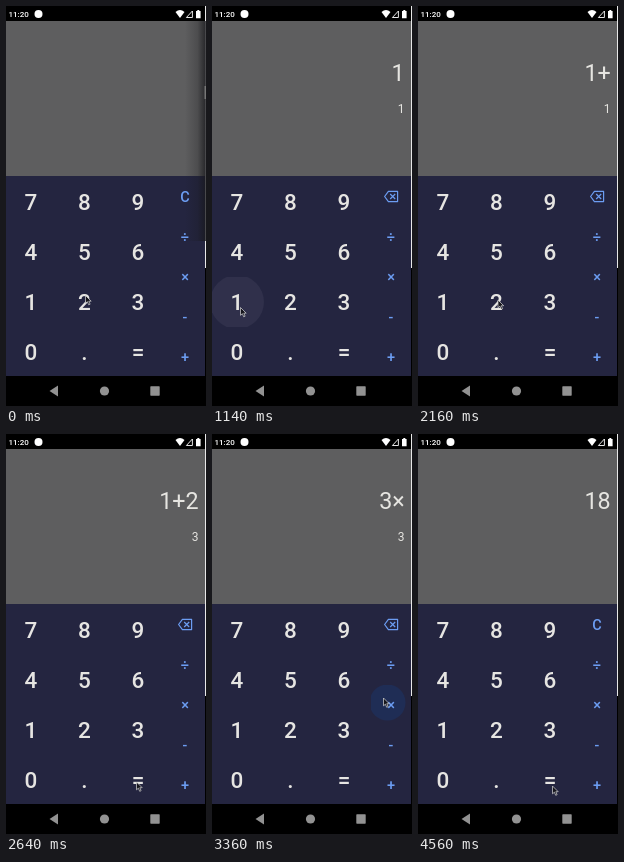
These frames come from a looping animation (200 px wide and 400 px high, 4.86 s). An HTML page:

```html
<!DOCTYPE html>
<html lang="en">
<head>
<meta charset="utf-8">
<title>Calculator</title>
<style>
  html, body { margin: 0; width: 100%; height: 100%; overflow: hidden; background: #000; }
  svg { display: block; width: 100%; height: 100%; }
  text { font-family: Roboto, sans-serif; }
  .key { font-size: 22.5px; font-weight: 500; fill: #e6e5e2; text-anchor: middle; }
  .op { font-size: 14.5px; font-weight: 500; fill: #6c9df2; text-anchor: middle; }
  .out { fill: #e6e5e1; text-anchor: end; }
</style>
</head>
<body>
<svg viewBox="0 0 200 400" xmlns="http://www.w3.org/2000/svg">
  <defs>
    <linearGradient id="shade">
      <stop offset="0" stop-color="#18181c" stop-opacity="0"/>
      <stop offset=".6" stop-color="#18181c" stop-opacity=".25"/>
      <stop offset="1" stop-color="#18181c" stop-opacity=".8"/>
    </linearGradient>
    <clipPath id="cell"><rect id="cellBox"/></clipPath>
  </defs>

  <rect width="200" height="400"/>
  <rect y="15" width="199" height="155" fill="#5e5e5f"/>
  <rect y="170" width="199" height="200" fill="#242540"/>
  <rect x="199" width="1" height="262" fill="#e8e8e8"/>
  <g id="edge">
    <rect x="179" y="15" width="21" height="220" fill="url(#shade)"/>
    <rect x="198.5" y="80" width="1.5" height="13" fill="#777"/>
  </g>

  <g fill="#fff">
    <text x="2.5" y="11" font-size="8" font-weight="500">11:20</text>
    <circle cx="32.5" cy="8" r="4"/>
    <path d="M169.5 6Q174 2 178.5 6L174 12Z"/>
    <path d="M180.4 11.5L186.4 5V11.5Z" fill="none" stroke="#fff" stroke-width=".9"/>
    <path d="M190 5h1.3v-1h2v1h1.3v7.2h-4.6z"/>
  </g>

  <g fill="#929292">
    <path d="M43.5 385L52 379.6V390.4Z"/>
    <circle cx="98.5" cy="385" r="4.6"/>
    <rect x="144.3" y="380.3" width="9.4" height="9.4" rx=".6"/>
  </g>

  <g clip-path="url(#cell)"><circle id="ripple"/></g>
  <g id="keys"></g>
  <text id="clear" class="op" x="179" y="196">C</text>
  <g id="del" fill="none" stroke="#6c9df2" stroke-width="1.2" stroke-linejoin="round">
    <path d="M172.6 190.5L176.4 185.4H185.6V195.6H176.4Z"/>
    <path d="M178.2 188l5 5m0-5l-5 5"/>
  </g>

  <text id="formula" class="out" x="192.7" y="74.5" font-size="23.3"></text>
  <text id="result" class="out" x="192.5" y="107" font-size="12"></text>
  <path id="cursor" d="M0 0V7.8L1.9 6.2L3.2 9.3L4.6 8.7L3.3 5.7H5.7Z" fill="#16161c" stroke="#d8d8d8" stroke-width=".7" stroke-linejoin="round"/>
</svg>
<script>
const LOOP = 4860, STEP = 60, FADE = 240;
const $ = id => document.getElementById(id);

function setAttrs(el, attrs) {
  for (const name in attrs) el.setAttribute(name, attrs[name]);
}

function addKey(label, cls, x, y) {
  const el = document.createElementNS("http://www.w3.org/2000/svg", "text");
  el.textContent = label;
  setAttrs(el, { class: cls, x, y });
  $("keys").append(el);
}

[..."7894561230.="].forEach((k, i) =>
  addKey(k, "key", 25 + 53.5 * (i % 3), 204 + 50 * Math.floor(i / 3)));
[..."÷×-+"].forEach((k, i) => addKey(k, "op", 179, 236 + 40 * i));

// Pointer stops: time, x, y
const path = [
  [0, 79.5, 289.5], [480, 28.5, 301.5], [1200, 28.5, 301.5], [1560, 125, 337],
  [1740, 176, 348], [1920, 176, 348], [2160, 80, 294], [2340, 80, 294],
  [2580, 130.5, 348], [2940, 130.5, 348], [3240, 171.5, 264], [3420, 171.5, 264],
  [3510, 133, 246], [3600, 133, 246], [3780, 135.5, 351.5], [4380, 135.5, 351.5],
  [4560, 134.5, 352]
];

// Display states: time, formula, result, clear label shown
const states = [
  [0, "", "", true], [960, "1", "1", false], [1800, "1+", "1", false],
  [2220, "1+2", "3", false], [3240, "3", "", true], [3360, "3×", "3", false],
  [3540, "3×6", "18", false], [4440, "18", "", true]
];

// Taps: time, key centre x, y, operator column
const taps = [
  [960, 25, 296], [1800, 179, 351, true], [2220, 78.5, 296], [2760, 132, 346],
  [3360, 179, 271, true], [3540, 132, 246], [3960, 132, 346]
];

const lastAt = (list, t) => list.filter(item => item[0] <= t).pop();
const mix = (a, b, k) => a + (b - a) * k;

function pointer(t) {
  const a = lastAt(path, t), b = path[path.indexOf(a) + 1];
  if (!b) return [a[1], a[2]];
  const k = (t - a[0]) / (b[0] - a[0]);
  return [mix(a[1], b[1], k), mix(a[2], b[2], k)];
}

function drawRipple(t) {
  const tap = lastAt(taps, t);
  const age = tap ? t - tap[0] : FADE;
  if (age >= FADE) return setAttrs($("ripple"), { opacity: 0 });
  const [start, x, y, op] = tap;
  const from = pointer(start);
  const k = Math.min(1, age / 180);
  const w = op ? 40 : 54, h = op ? 40 : 50;
  setAttrs($("cellBox"), { x: x - w / 2, y: y - h / 2, width: w, height: h });
  setAttrs($("ripple"), {
    cx: mix(from[0] + 4, x, k), cy: mix(from[1] + 4.5, y, k),
    r: mix(18, op ? 22 : 27, k),
    fill: op ? "#1f2d55" : "#41425a",
    opacity: Math.min(1, (FADE - age) / 150)
  });
}

function draw(time) {
  const t = Math.floor((time % LOOP) / STEP) * STEP;
  const [, formula, result, clear] = lastAt(states, t);
  $("formula").textContent = formula;
  $("result").textContent = result;
  setAttrs($("clear"), { opacity: clear ? 1 : 0 });
  setAttrs($("del"), { opacity: clear ? 0 : 1 });
  setAttrs($("edge"), { opacity: t < 960 ? 1 : 0 });
  setAttrs($("cursor"), { transform: `translate(${pointer(t)})` });
  drawRipple(t);
}

const begin = performance.now();
function tick() {
  draw(performance.now() - begin);
  requestAnimationFrame(tick);
}
tick();
</script>
</body>
</html>
```
